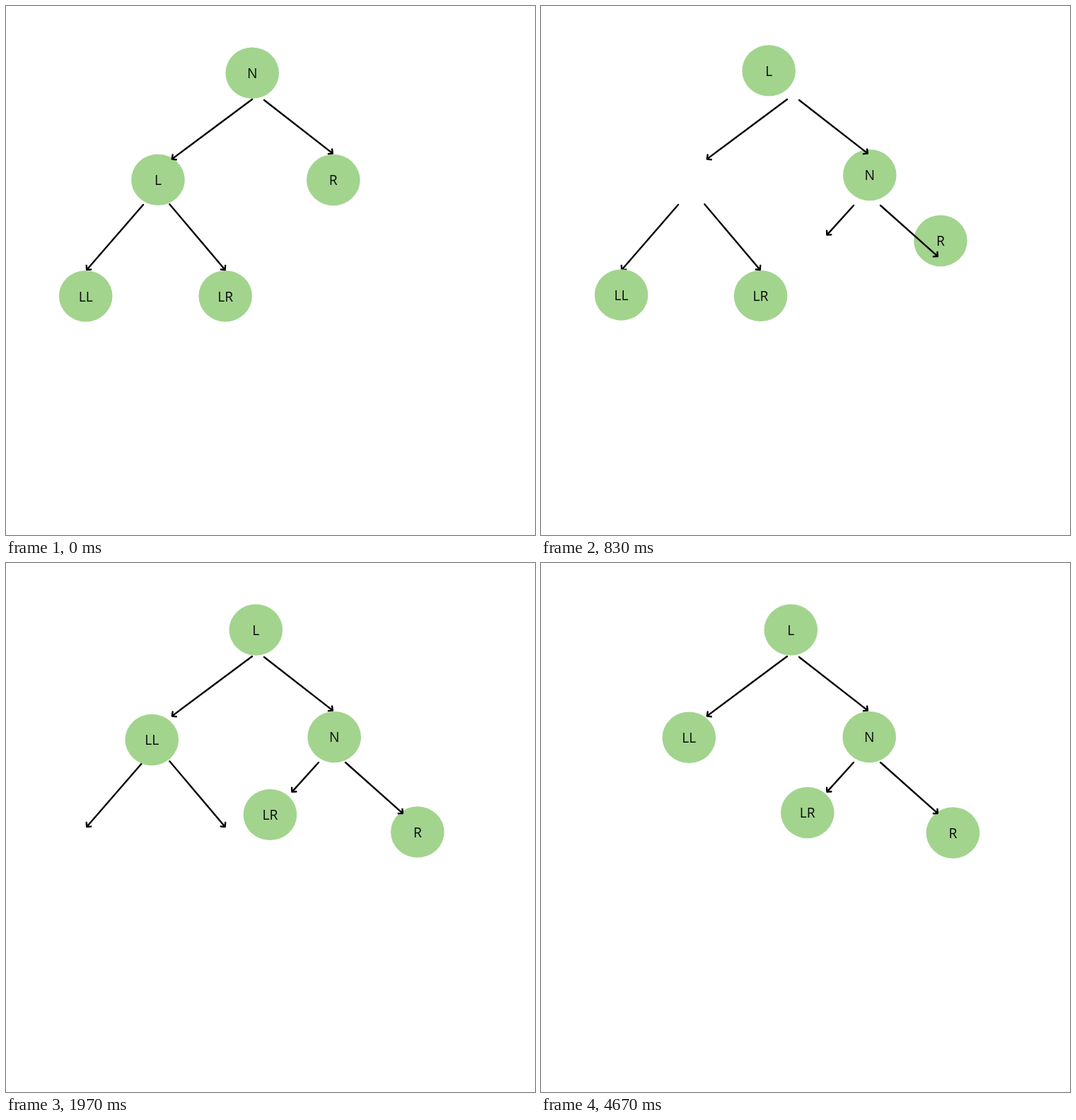
Animation, 748 px wide and 748 px high, one loop 5010 ms. Source, as an HTML page:

```html
<!DOCTYPE html>
<html lang="en">
<head>
<meta charset="utf-8">
<title>Tree rotation</title>
<style>
  html, body { margin: 0; width: 100%; height: 100%; overflow: hidden; background: #fff; }
  svg { display: block; width: 100%; height: 100%; }
  ellipse { fill: #a2d48e; }
  text { font: 19.3px "Open Sans", "Noto Sans", sans-serif; text-anchor: middle; fill: #0c0c0c; }
  path { fill: none; stroke: #000; stroke-width: 2.4; stroke-linecap: round; stroke-linejoin: round; }
</style>
</head>
<body>
<svg viewBox="0 0 748 748">
  <clipPath id="wipe"><rect x="470" y="270" height="100" width="0"/></clipPath>
  <g id="under"></g><g id="nodes"></g><g id="over"></g>
</svg>
<script>
const LOOP = 5010;
const $ = id => document.getElementById(id);
const clamp = x => Math.min(1, Math.max(0, x));

function make(tag, attrs = {}) {
  const el = document.createElementNS("http://www.w3.org/2000/svg", tag);
  for (const k in attrs) el.setAttribute(k, attrs[k]);
  return el;
}
const add = (parent, tag, attrs) => parent.appendChild(make(tag, attrs));

// Straight line with an open 45 degree head
function arrow(parent, x1, y1, x2, y2) {
  const back = Math.atan2(y1 - y2, x1 - x2);
  const wing = a => (x2 + 6 * Math.cos(back + a)) + " " + (y2 + 6 * Math.sin(back + a));
  const q = Math.PI / 4;
  return add(parent, "path", {
    d: `M${x1} ${y1}L${x2} ${y2}M${wing(q)}L${x2} ${y2}L${wing(-q)}`
  });
}

// A labelled node that follows a path: start time, time to half way
function node(name, start, half, d) {
  const g = add($("nodes"), "g");
  add(g, "ellipse", { rx: 37.8, ry: 36.2 });
  add(g, "text", { y: 7.4 }).textContent = name;
  const path = make("path", { d });
  return { g, path, length: path.getTotalLength(), start, half };
}

const nodes = [
  node("N", 30, 335, "M348.2 94.8L466 224L464.2 246"),
  node("L", -80, 550, "M214.8 246L285.3 98.2L334 89.2L353.3 94.5"),
  node("R", 30, 600, "M462.8 246L552 277.3L571.3 359L582.4 381.5"),
  node("LR", 700, 580, "M310.2 410.2L376.8 353"),
  node("LL", 700, 483, "M112.7 410.2L180 277.2L209.3 246.8")
];

// Quick S-curve with a long tail
const glide = u => u > 0 ? Math.min(1, 1.01 / (1 + u ** -3.5)) : 0;

const over = $("over");
arrow(over, 348, 132, 234.8, 216.4);
arrow(over, 365, 133, 461.8, 208.4);
const leaving = [
  arrow($("under"), 194, 281, 114.2, 373),
  arrow(over, 231.3, 280.3, 309.7, 373)
];
const popped = arrow(over, 442, 282, 404.4, 323.6);
arrow(over, 480, 282, 560.8, 353.9).setAttribute("clip-path", "url(#wipe)");
const wipe = document.querySelector("#wipe rect");

function draw(t) {
  for (const { g, path, length, start, half } of nodes) {
    const { x, y } = path.getPointAtLength(length * glide((t - start) / half));
    g.setAttribute("transform", `translate(${x} ${y})`);
  }

  // Short arrow pops in with a damped overshoot
  const p = Math.max(0, t - 280) / 100;
  const s = 1 - Math.exp(-p) * Math.cos(p * 1.9);
  popped.setAttribute("transform", `translate(423 303) scale(${s}) translate(-423 -303)`);
  popped.setAttribute("visibility", s > 0 ? "visible" : "hidden");

  const w = clamp((t - 300) / 600);
  wipe.setAttribute("width", 100 * w * w * (3 - 2 * w));

  // Unused arrows rise and fade away
  const e = clamp((t - 4410) / 260);
  for (const a of leaving) {
    a.setAttribute("transform", `translate(0 ${-95 * e * e})`);
    a.setAttribute("opacity", 1 - e);
  }
}

const begin = performance.now();
function tick() {
  draw((performance.now() - begin) % LOOP);
  requestAnimationFrame(tick);
}
tick();
</script>
</body>
</html>
```
